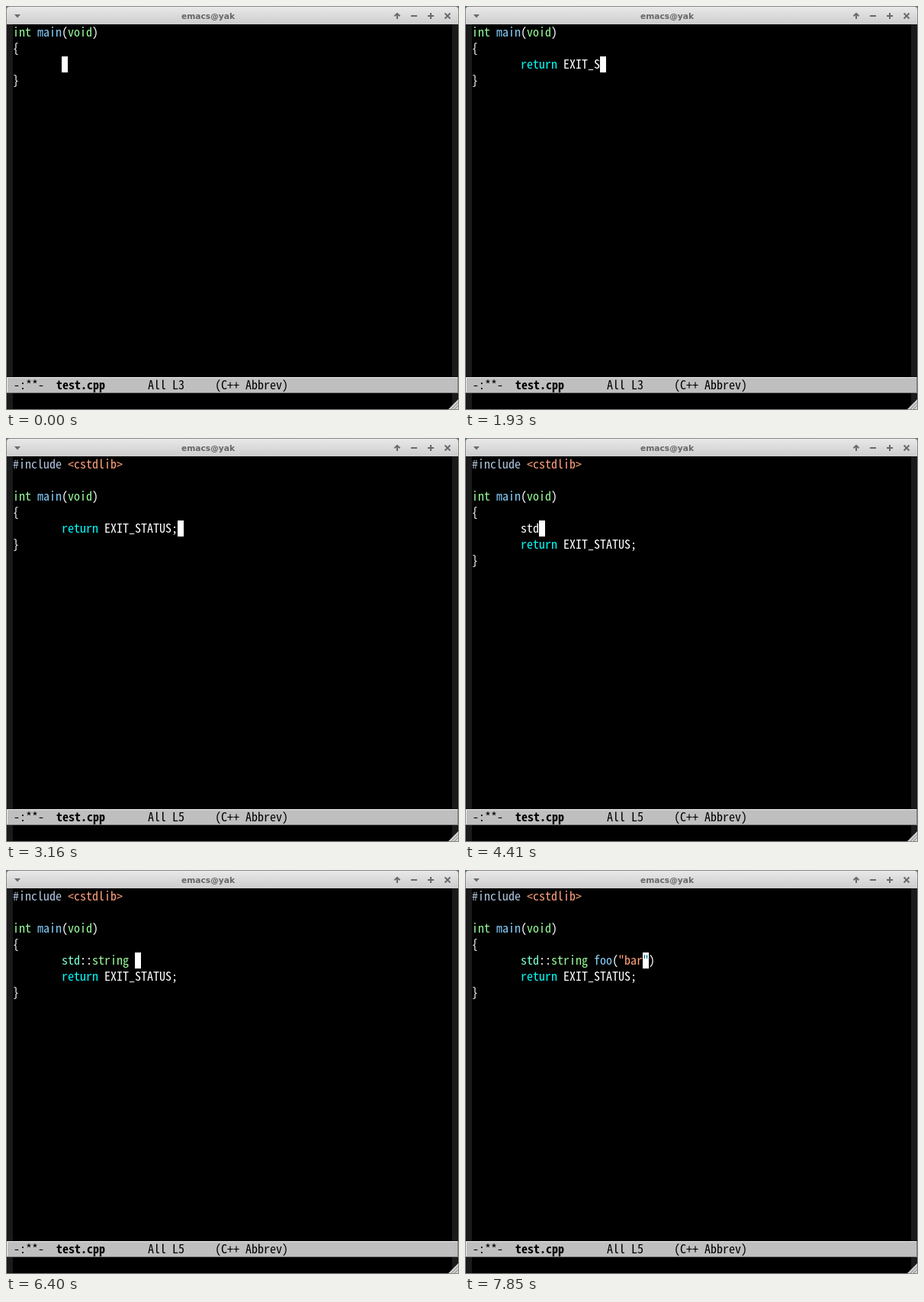
These frames come from a looping animation (594x529 px, 8000 ms). An HTML page:

```html
<!DOCTYPE html>
<html lang="en">
<head>
<meta charset="utf-8">
<title>Editor</title>
<style>
html, body { margin: 0; width: 100%; height: 100%; overflow: hidden; background: #000; }
svg { display: block; width: 594px; height: 529px; }
.code { font: 16px "Noto Sans Mono CJK JP", "Noto Sans Mono CJK SC", "Noto Sans Mono CJK KR", "Noto Sans Mono CJK TC", "Noto Sans Mono", monospace; }
text { white-space: pre; }
.title { font: bold 10.67px "DejaVu Sans", sans-serif; fill: #666; }
.icon { fill: none; stroke: #6a6a6a; stroke-width: 2; }
</style>
</head>
<body>
<svg viewBox="0 0 594 529">
  <defs>
    <linearGradient id="bar" x2="0" y2="1">
      <stop offset="0" stop-color="#e9e9e9"/>
      <stop offset="1" stop-color="#cdcdcd"/>
    </linearGradient>
  </defs>

  <rect width="594" height="529" fill="#4f7478"/>
  <path d="M0 529V5Q0 0 5 0H589Q594 0 594 5V529Z" fill="#858585"/>
  <path d="M1 24V5Q1 1 5 1H589Q593 1 593 5V24Z" fill="url(#bar)"/>
  <path d="M11 11H19L15 15.5Z" fill="#6a6a6a"/>
  <text class="title" x="230" y="17">emacs@yak</text>
  <g class="icon">
    <path d="M513 17V10M509.5 13.2L513 9.8L516.5 13.2"/>
    <path d="M531 13H539M553 13H561M557 9V17"/>
    <path d="M575.5 9.5L582.5 16.5M582.5 9.5L575.5 16.5"/>
  </g>

  <rect x="1" y="24" width="592" height="504" fill="#1a1a1a"/>
  <rect x="9" y="24" width="576" height="504"/>
  <rect x="1" y="486" width="592" height="21" fill="#bfbfbf"/>
  <path d="M1.5 507V486.5H593" fill="none" stroke="#f2f2f2"/>
  <path d="M1 506.5H592.5V486" fill="none" stroke="#7c7c7c"/>
  <path d="M593 515V528H580Z" fill="#d0d0d0"/>
  <path d="M584 528L593 519M588 528L593 523" stroke="#858585"/>

  <g class="code">
    <text x="10" y="502">-:**-</text>
    <text x="66" y="502" font-weight="bold">test.cpp</text>
    <text x="186" y="502" id="line">All L3</text>
    <text x="274" y="502">(C++ Abbrev)</text>
  </g>
  <g class="code" id="buffer"></g>
</svg>

<script>
const LOOP = 8000;
const C = {
  plain: '#ffffff', type: '#98fb98', func: '#87cefa', key: '#00ffff',
  str: '#ffa07a', pre: '#b0c4de', name: '#7fffd4', black: '#000000', inverse: '#005f85'
};
const buffer = document.getElementById('buffer');
const line = document.getElementById('line');

// n evenly spaced key presses
const keys = (from, to, n) =>
  Array.from({ length: n }, (_, i) => from + (to - from) * i / (n - 1));

const RETURN = 'return EXIT_STATUS;';
const returnKeys = [
  ...keys(130, 980, 8), ...keys(1230, 1530, 3),
  1810, 1930, ...keys(2080, 2470, 5), 2740
];
const DECL = 'std::string foo("bar';
const declKeys = [
  ...keys(4130, 4410, 3), ...keys(4670, 5700, 8), 5930,
  ...keys(6440, 7140, 5), ...keys(7530, 7850, 3)
];

const typed = (text, times, t) => text.slice(0, times.filter(k => k <= t).length);
const escapeText = s => s.replace(/&/g, '&amp;').replace(/</g, '&lt;');

// parts: [text, colour] pairs set one after another
function row(r, col, ...parts) {
  let out = '';
  for (const [s, colour] of parts) {
    if (s.trim())
      out += `<text x="${9 + 8 * col}" y="${40 + 21 * r}" fill="${colour}">${escapeText(s)}</text>`;
    col += s.length;
  }
  return out;
}

const cursor = (r, col) =>
  `<rect x="${9 + 8 * col}" y="${24 + 21 * r}" width="8" height="21" fill="#fff"/>`;

function declaration(r, t) {
  const s = typed(DECL, declKeys, t);
  const close = !s.includes('(') ? '' : t >= 7180 ? '")' : ')';
  const end = 8 + s.length;
  let out = row(r, 8,
    [s.slice(0, 3), s.length >= 5 ? C.name : C.plain],
    [s.slice(3, 5), C.plain],
    [s.slice(5, 12), t >= 6400 ? C.type : C.plain],
    [s.slice(12, 15), C.func],
    [s.slice(15, 16), C.plain],
    [s.slice(16), C.str],
    [close, C.plain]);
  if (t < 5930 || t >= 5970) out += cursor(r, end);
  if (close) out += row(r, end, [close[0], close[0] === '"' ? C.inverse : C.black]);
  return out;
}

function picture(t) {
  const included = t >= 3120, opened = t >= 3850;
  const top = included ? 2 : 0;
  const ret = typed(RETURN, returnKeys, t);
  const retRow = top + (opened ? 3 : 2);
  let out = included ? row(0, 0, ['#include ', C.pre], ['<cstdlib>', C.str]) : '';
  out += row(top, 0, ['int', C.type], [' ', C.plain], ['main', C.func],
    ['(', C.plain], ['void', C.type], [')', C.plain]);
  out += row(top + 1, 0, ['{', C.plain]);
  out += row(retRow, 8,
    [ret.slice(0, 6), ret.length >= 6 ? C.key : C.plain], [ret.slice(6), C.plain]);
  out += row(retRow + 1, 0, ['}', C.plain]);
  if (opened) out += declaration(top + 2, t);
  else out += t >= 3480 ? cursor(top + 1, 1) : cursor(retRow, 8 + ret.length);
  return out;
}

function lineNumber(t) {
  if (t < 3160) return 3;
  return t >= 3480 && t < 3890 ? 4 : 5;
}

let shown = '';
const start = performance.now();
function draw() {
  const t = (performance.now() - start) % LOOP;
  const next = picture(t);
  if (next !== shown) buffer.innerHTML = shown = next;
  const label = 'All L' + lineNumber(t);
  if (line.textContent !== label) line.textContent = label;
  requestAnimationFrame(draw);
}
draw();
</script>
</body>
</html>
```
